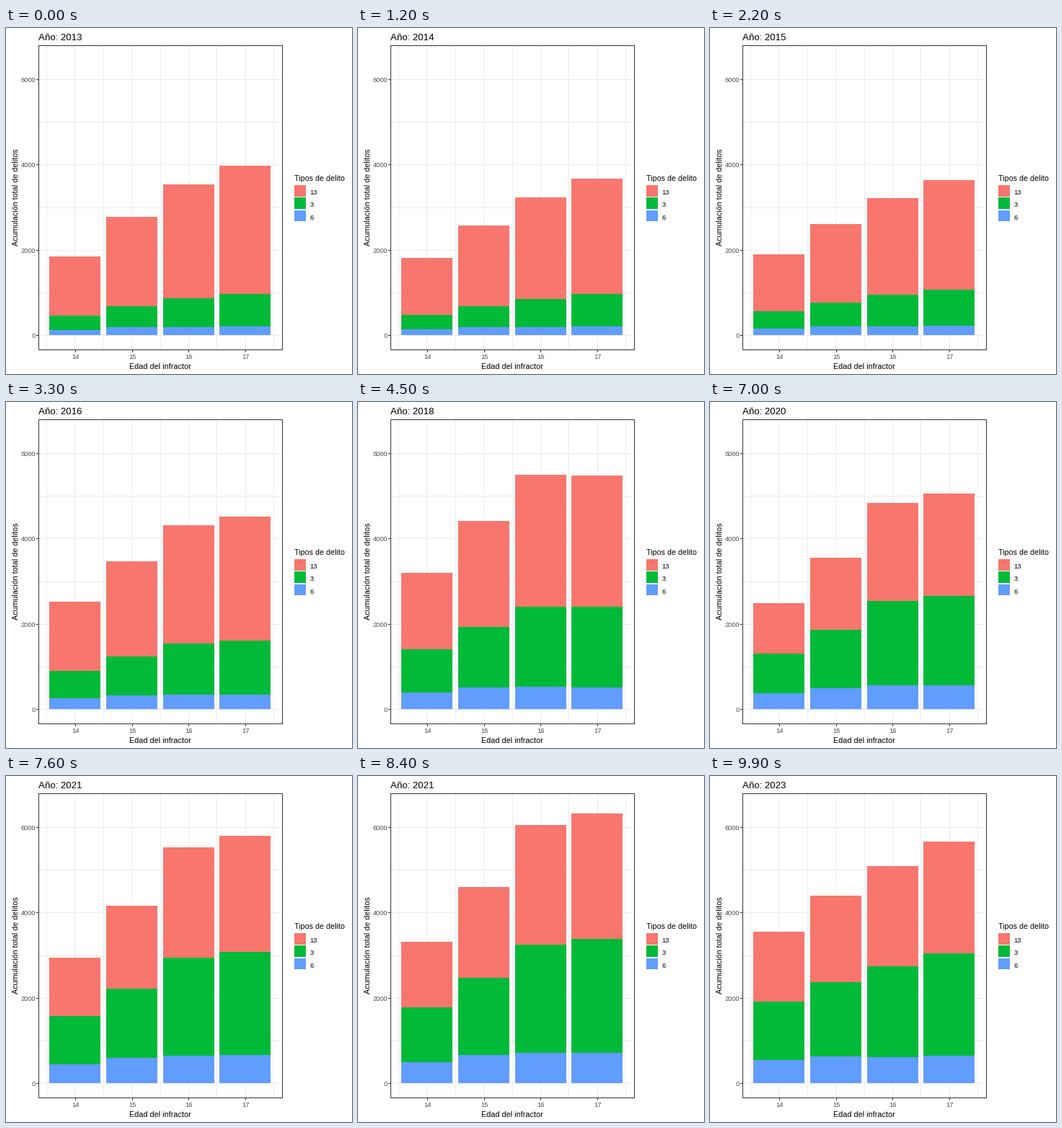
A matplotlib script for the animation above (10000 ms loop, 480x480 px).

```python
import matplotlib.pyplot as plt
import numpy as np
from matplotlib.animation import FuncAnimation
from matplotlib.patches import Rectangle

FRAMES, SIZE, DPI = 100, 480, 100
FIRST, LAST = 2013, 2023
RED, GREEN, BLUE = "#F8766D", "#00BA38", "#619CFF"
GRID, DARK, GREY = "#EBEBEB", "#333333", "#4D4D4D"
BASE, PX_PER_COUNT = 426, 355 / 6000
PITCH = 78.8

# Total counts for ages 14 to 17 at the turning points.
TURNS = {
    2013: (1840, 2770, 3530, 3970),
    2015: (1780, 2445, 3015, 3475),
    2018: (3420, 4725, 5890, 5800),
    2019: (3510, 4835, 6350, 6135),
    2020: (2405, 3450, 4715, 4930),
    2021: (3175, 4460, 5880, 6170),
    2022: (3450, 4730, 6220, 6470),
    2023: (3550, 4395, 5085, 5660),
}
# Part of the two lower layers that is blue, by age.
BLUE_SHARE = np.array((0.28, 0.265, 0.22, 0.212))

# Each year falls on a whole frame.
keys = [round(1 + 9.9 * (year - FIRST)) - 1 for year in TURNS]
tracks = list(zip(*TURNS.values()))

plt.rcParams["font.family"] = "Liberation Sans"
fig = plt.figure(figsize=(SIZE / DPI, SIZE / DPI), dpi=DPI, facecolor="white")
ax = fig.add_axes([0, 0, 1, 1])
ax.set_xlim(0, SIZE)
ax.set_ylim(SIZE, 0)
ax.axis("off")


def box(x, y, w, h, color, z=1):
    return ax.add_patch(Rectangle((x, y), w, h, fc=color, lw=0,
                                  antialiased=False, zorder=z))


def label(x, y, text, size, color="black", **kw):
    kw.setdefault("va", "baseline")
    return ax.text(x, y, text, fontsize=size * 72 / DPI, color=color, **kw)


# Grid, ticks and axis labels
for k in range(9):
    box(int(56.5 + k * PITCH / 2), 25, 1, 421, GRID)
for k in range(7):
    box(46, int(426.6 - k * 500 * 2 * PX_PER_COUNT), 337, 1, GRID)
for k in range(4):
    x = int(96.2 + k * PITCH)
    box(x, 447, 1, 3, DARK)
    label(x + 0.5, 459, 14 + k, 9.4, GREY, ha="center")
for count in range(0, 8000, 2000):
    y = int(426.6 - count * PX_PER_COUNT)
    box(42, y, 3, 1, DARK)
    label(40.8, y + 4, count, 9.2, GREY, ha="right")

# Panel border
for y in (24, 446):
    box(45, y, 339, 1, DARK, 4)
for x in (45, 383):
    box(x, 24, 1, 423, DARK, 4)

label(213.5, 473, "Edad del infractor", 10.8, ha="center")
label(19, 234.5, "Acumulación total de delitos", 10.6, rotation=90,
      ha="right", va="center")
title = label(45, 17, "", 13.2)

# Legend
label(400, 212, "Tipos de delito", 10.6)
for y, h, color, name in ((218, 16, RED, "13"), (235, 16, GREEN, "3"),
                          (253, 15, BLUE, "6")):
    box(400, y, 16, h, color)
    label(421.5, y + 13, name, 9.4)

# Lower layers are painted over the taller ones.
bars = [[box(int(60.5 + k * PITCH), BASE, 71, 0, color, z) for k in range(4)]
        for z, color in ((2, RED), (2.1, GREEN), (2.2, BLUE))]


def lower_share(t):
    """Part of the total held by green and blue, rising as an S-curve."""
    return 0.235 + 0.305 / (1 + np.exp((3.8 - t) / 1.1))


def update(i):
    t = (LAST - FIRST) * i / (FRAMES - 1)
    total = np.array([np.interp(i, keys, track) for track in tracks])
    lower = total * lower_share(t)
    for row, counts in zip(bars, (total, lower, lower * BLUE_SHARE)):
        for bar, count in zip(row, counts):
            h = round(count * PX_PER_COUNT)
            bar.set_y(BASE - h)
            bar.set_height(h)
    title.set_text(f"Año: {round(FIRST + t)}")
    return [title]


anim = FuncAnimation(fig, update, frames=FRAMES, interval=100,
                     repeat=True, repeat_delay=0)
plt.show()
```
